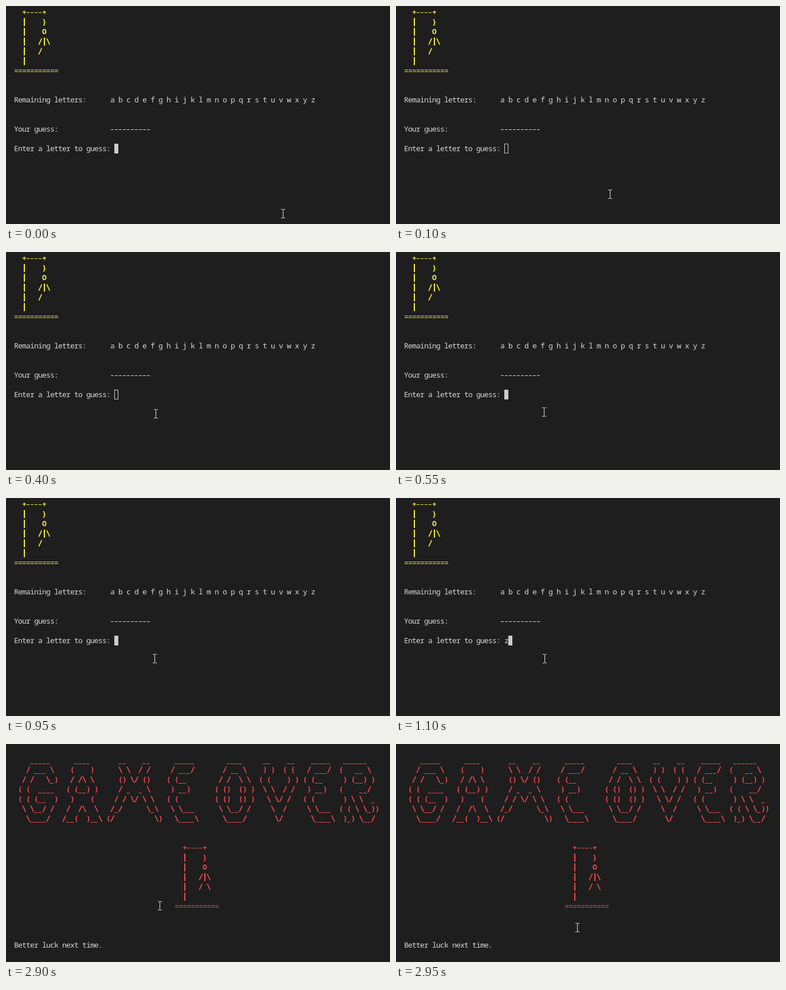
These frames come from a looping animation (670 px wide and 380 px high, 3 s). An HTML page with a canvas:

```html
<!DOCTYPE html>
<html lang="en">
<head>
<meta charset="utf-8">
<title>Hangman in a terminal</title>
<style>
  html, body { margin: 0; width: 100%; height: 100%; overflow: hidden; background: #1e1e1e; }
  canvas { display: block; }
</style>
</head>
<body>
<canvas id="stage" width="670" height="380"></canvas>
<script>
const ctx = document.getElementById('stage').getContext('2d');

const LOOP = 3000, STEP = 50;
const LEFT = 14, TOP = 2, CELL = 7, LINE = 17, BASELINE = 13;
const COLORS = {
  back: '#1e1e1e', text: '#d8d8d8', caret: '#cccccc',
  yellow: '#f9ee3c', red: '#fa4848', pointer: '#e4e4e4'
};
const FONT = '13px "Noto Sans Mono", "DejaVu Sans Mono", monospace';

const lines = (strings) => String.raw(strings).split('\n').slice(1, -1);

const LETTERS = {
  G: lines`
   _____
  / ___ \
 / /   \_)
( (  ____
( ( (__  )
 \ \__/ /
  \____/
`,
  A: lines`
   ____
  (    )
  / /\ \
 ( (__) )
  )    (
 /  /\  \
/__(  )__\
`,
  M: lines`
   __    __
   \ \  / /
   () \/ ()
   / _  _ \
  / / \/ \ \
 /_/      \_\
(/          \)
`,
  E: lines`
  _____
 / ___/
( (__
 ) __)
( (
 \ \___
  \____\
`,
  O: lines`
   ____
  / __ \
 / /  \ \
( ()  () )
( ()  () )
 \ \__/ /
  \____/
`,
  V: lines`
 __    __
 ) )  ( (
( (    ) )
 \ \  / /
  \ \/ /
   \  /
    \/
`,
  R: lines`
 ______
(   __ \
 ) (__) )
(    __/
 ) \ \  _
( ( \ \_))
 )_) \__/
`
};
const BANNER = [['G', 1], ['A', 12], ['M', 23], ['E', 38], ['O', 50], ['V', 61], ['E', 72], ['R', 81]];

const gallows = (legs) => [
  '  +----+', '  |    }', '  |    O', '  |   /|\\', '  |   ' + legs, '  |', '='.repeat(11)
];

function line(x1, y1, x2, y2) {
  ctx.beginPath();
  ctx.moveTo(x1, y1);
  ctx.lineTo(x2, y2);
  ctx.stroke();
}

// Line-art characters are stroked to the cell grid; x is the cell's left edge, y the baseline.
const STROKES = {
  '_': (x, y) => ctx.fillRect(x, y + 2, 6, 1),
  '-': (x, y) => ctx.fillRect(x + 1, y - 4, 5, 1),
  '=': (x, y) => {
    ctx.fillRect(x + 1, y - 6, 6, 1);
    ctx.fillRect(x + 1, y - 3, 6, 1);
  },
  '|': (x, y) => ctx.fillRect(x + 3, y - 11, 2, 14),
  '/': (x, y) => line(x + 1.2, y + 1.5, x + 6.3, y - 9.5),
  '\\': (x, y) => line(x + 1.2, y - 9.5, x + 6.3, y + 1.5)
};

function print(text, col, row, color = COLORS.text, weight = 'normal') {
  ctx.font = weight + ' ' + FONT;
  ctx.fillStyle = ctx.strokeStyle = color;
  ctx.lineWidth = 1.7;
  const y = TOP + row * LINE + BASELINE;
  [...text].forEach((ch, i) => {
    const x = LEFT + (col + i) * CELL;
    if (STROKES[ch]) STROKES[ch](x, y);
    else if (ch !== ' ') ctx.fillText(ch, x, y);
  });
}

function printBlock(rows, col, row, color) {
  rows.forEach((text, i) => print(text, col, row + i, color, 'bold'));
}

function drawCaret(col, row, filled) {
  const x = LEFT + col * CELL, y = TOP + row * LINE;
  if (filled) {
    ctx.fillStyle = COLORS.caret;
    ctx.fillRect(x, y, CELL, LINE);
  } else {
    ctx.strokeStyle = COLORS.caret;
    ctx.lineWidth = 1;
    ctx.strokeRect(x + 0.5, y + 0.5, CELL - 1, LINE - 1);
  }
}

function drawPointer([x, y]) {
  ctx.fillStyle = COLORS.pointer;
  for (const edge of [y - 8, y + 7]) {
    ctx.fillRect(x - 3, edge, 3, 1);
    ctx.fillRect(x + 1, edge, 3, 1);
  }
  ctx.fillRect(x, y - 7, 1, 14);
}

function pointerAt(t) {
  if (t >= 2950) return [316, 320];
  if (t >= 2900) return [268, 282];
  if (t >= 950) return [259, 280];
  const rest = 1 - Math.min(t / 550, 1);
  return [Math.round(258 + 225 * rest ** 3.33), Math.round(279 + 83 * rest ** 2.61)];
}

function drawGame(t) {
  const typed = t >= 1100 ? 'z' : '';
  const prompt = 'Enter a letter to guess: ' + typed;
  printBlock(gallows('/'), 0, 0, COLORS.yellow);
  print('Remaining letters:', 0, 9);
  print([...'abcdefghijklmnopqrstuvwxyz'].join(' '), 24, 9);
  print('Your guess:', 0, 12);
  print('-'.repeat(10), 24, 12);
  print(prompt, 0, 14);
  drawCaret(prompt.length, 14, t < 50 || t >= 550);
}

function drawGameOver() {
  for (const [letter, col] of BANNER) printBlock(LETTERS[letter], col, 1, COLORS.red);
  printBlock(gallows('/ \\'), 40, 10, COLORS.red);
  print('Better luck next time.', 0, 20);
}

function draw(t) {
  ctx.fillStyle = COLORS.back;
  ctx.fillRect(0, 0, 670, 380);
  if (t < 1650) drawGame(t);
  else drawGameOver();
  drawPointer(pointerAt(t));
}

const start = performance.now();
function tick() {
  const t = (performance.now() - start) % LOOP;
  draw(Math.floor(t / STEP) * STEP);
  requestAnimationFrame(tick);
}
tick();
</script>
</body>
</html>
```
